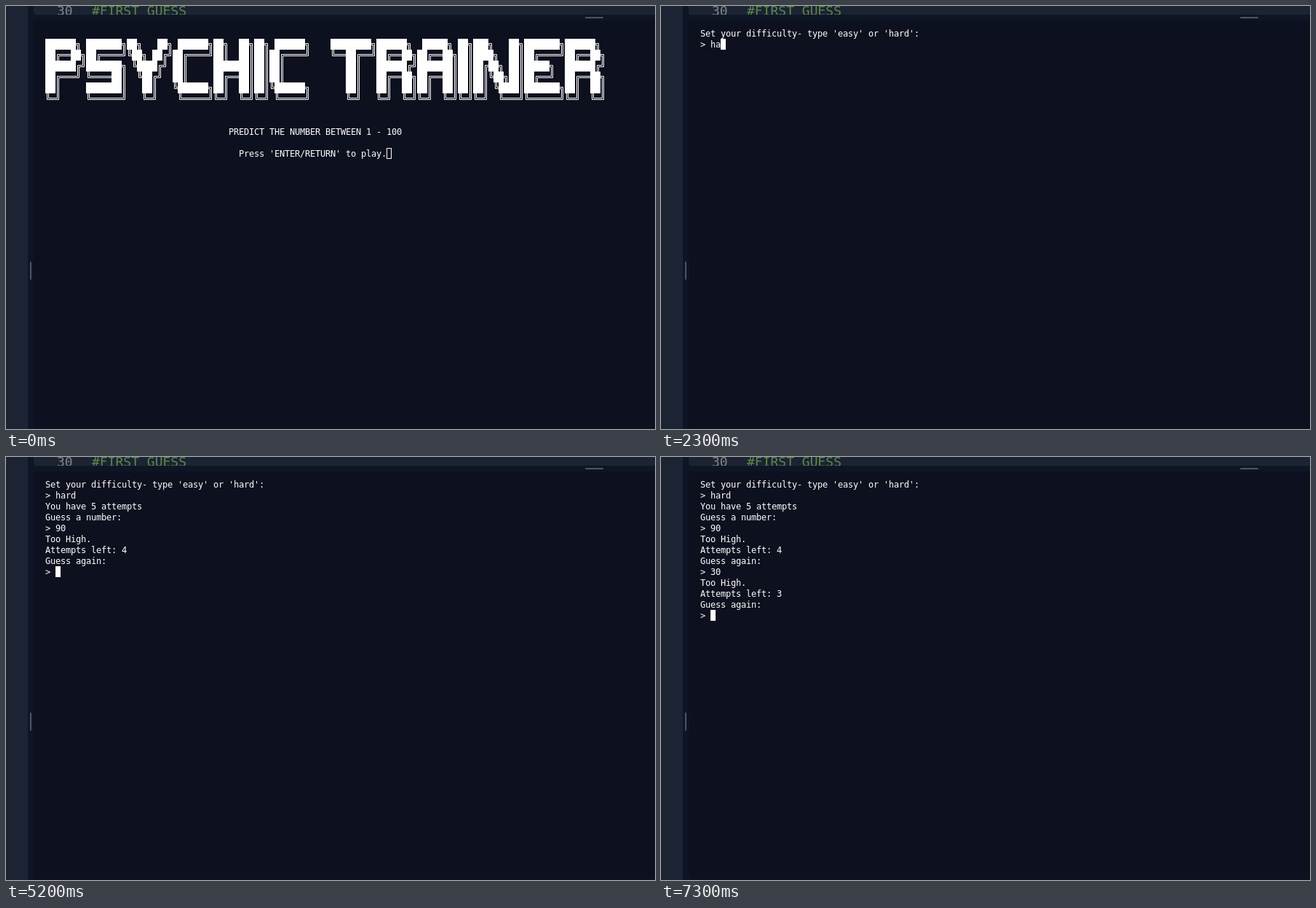
Write an HTML page with a canvas that moves like this. It is 892 px wide and 581 px high and loops after 8000 ms.

```html
<!DOCTYPE html>
<html lang="en">
<head>
<meta charset="utf-8">
<title>Terminal guessing game</title>
<style>
html, body { margin: 0; width: 100%; height: 100%; overflow: hidden; background: #0e1525; }
canvas { display: block; }
</style>
</head>
<body>
<canvas id="stage" width="892" height="581"></canvas>
<script>
const ctx = document.getElementById('stage').getContext('2d');
const LOOP = 8000;
const CELL = { w: 7, h: 15, x: 54, y: 30 };
const MONO = '"DejaVu Sans Mono", monospace';

const banner = [
  '██████╗ ███████╗██╗   ██╗ ██████╗██╗  ██╗██╗ ██████╗    ████████╗██████╗  █████╗ ██╗███╗   ██╗███████╗██████╗ ',
  '██╔══██╗██╔════╝╚██╗ ██╔╝██╔════╝██║  ██║██║██╔════╝    ╚══██╔══╝██╔══██╗██╔══██╗██║████╗  ██║██╔════╝██╔══██╗',
  '██████╔╝███████╗ ╚████╔╝ ██║     ███████║██║██║            ██║   ██████╔╝███████║██║██╔██╗ ██║█████╗  ██████╔╝',
  '██╔═══╝ ╚════██║  ╚██╔╝  ██║     ██╔══██║██║██║            ██║   ██╔══██╗██╔══██║██║██║╚██╗██║██╔══╝  ██╔══██╗',
  '██║     ███████║   ██║   ╚██████╗██║  ██║██║╚██████╗       ██║   ██║  ██║██║  ██║██║██║ ╚████║███████╗██║  ██║',
  '╚═╝     ╚══════╝   ╚═╝    ╚═════╝╚═╝  ╚═╝╚═╝ ╚═════╝       ╚═╝   ╚═╝  ╚═╝╚═╝  ╚═╝╚═╝╚═╝  ╚═══╝╚══════╝╚═╝  ╚═╝'
];
const title = ['', ...banner, '', '',
  ' '.repeat(36) + 'PREDICT THE NUMBER BETWEEN 1 - 100', '',
  ' '.repeat(38) + "Press 'ENTER/RETURN' to play."];

const level = ["Set your difficulty- type 'easy' or 'hard':", '> '];
const first = [level[0], '> hard', 'You have 5 attempts', 'Guess a number:', '> '];
const reply = (lines, typed, left) =>
  [...type(lines, typed), 'Too High.', 'Attempts left: ' + left, 'Guess again:', '> '];
const type = (lines, typed) => [...lines.slice(0, -1), '> ' + typed];
const second = reply(first, '90', 4);
const third = reply(second, '30', 3);

const steps = [
  [0, title, true], [300, title], [800, level],
  [2200, type(level, 'h')], [2300, type(level, 'ha')],
  [2500, type(level, 'har')], [2700, type(level, 'hard')],
  [3100, first], [4800, type(first, '9')], [5000, type(first, '90')],
  [5200, second], [6700, type(second, '3')], [7000, type(second, '30')],
  [7300, third]
];

function box(color, x, y, w, h, radii = 0) {
  ctx.fillStyle = color;
  ctx.beginPath();
  ctx.roundRect(x, y, w, h, radii);
  ctx.fill();
}

function drawFrame() {
  box('#0e1525', 0, 0, 892, 581);
  box('#1c2333', 0, 0, 30, 581);
  box('#1c2333', 38, 0, 854, 12, [0, 0, 0, 4]);
  box('#0d101e', 38, 20, 854, 560, [4, 0, 0, 4]);
  box('#4e5569', 796, 15, 25, 2, 1);
  box('#4e5569', 33, 351, 2, 25, 1);
  ctx.save();
  ctx.beginPath();
  ctx.rect(38, 0, 854, 12);
  ctx.clip();
  ctx.font = '18px ' + MONO;
  ctx.fillStyle = '#858585';
  ctx.fillText('30', 70, 13);
  ctx.fillStyle = '#5a8a4e';
  ctx.fillText('#FIRST GUESS', 118, 13);
  ctx.restore();
}

// Double-line corners: arms to the left or right, up or down.
const corners = { '╔': [1, 1], '╗': [-1, 1], '╚': [1, -1], '╝': [-1, -1] };

function drawCorner(x, y, [dx, dy]) {
  const cx = x + 3.5, cy = y + 7.5;
  for (const d of [1, -1]) {
    const px = cx + d * dx, py = cy + d * dy;
    ctx.beginPath();
    ctx.moveTo(dx > 0 ? x + 7 : x, py);
    ctx.lineTo(px, py);
    ctx.lineTo(px, dy > 0 ? y + 15 : y);
    ctx.stroke();
  }
}

function drawChar(ch, x, y) {
  if (ch === '█') ctx.fillRect(x, y, 7, 15);
  else if (ch === '═') {
    ctx.fillRect(x, y + 6, 7, 1);
    ctx.fillRect(x, y + 8, 7, 1);
  } else if (ch === '║') {
    ctx.fillRect(x + 2, y, 1, 15);
    ctx.fillRect(x + 4, y, 1, 15);
  } else if (corners[ch]) drawCorner(x, y, corners[ch]);
  else if (ch !== ' ') ctx.fillText(ch, x, y + 12);
}

function drawTerminal(lines, hollow) {
  ctx.font = '12px ' + MONO;
  ctx.fillStyle = ctx.strokeStyle = '#fff';
  ctx.lineWidth = 1;
  lines.forEach((line, row) => [...line].forEach((ch, col) =>
    drawChar(ch, CELL.x + col * CELL.w, CELL.y + row * CELL.h)));
  const x = CELL.x + lines.at(-1).length * CELL.w;
  const y = CELL.y + (lines.length - 1) * CELL.h;
  if (hollow) ctx.strokeRect(x + .5, y + .5, CELL.w - 1, CELL.h - 1);
  else ctx.fillRect(x, y, CELL.w, CELL.h);
}

const start = performance.now();
function tick() {
  const t = (performance.now() - start) % LOOP;
  const [, lines, hollow] = steps.findLast(([at]) => at <= t);
  drawFrame();
  drawTerminal(lines, hollow);
  requestAnimationFrame(tick);
}
tick();
</script>
</body>
</html>
```
